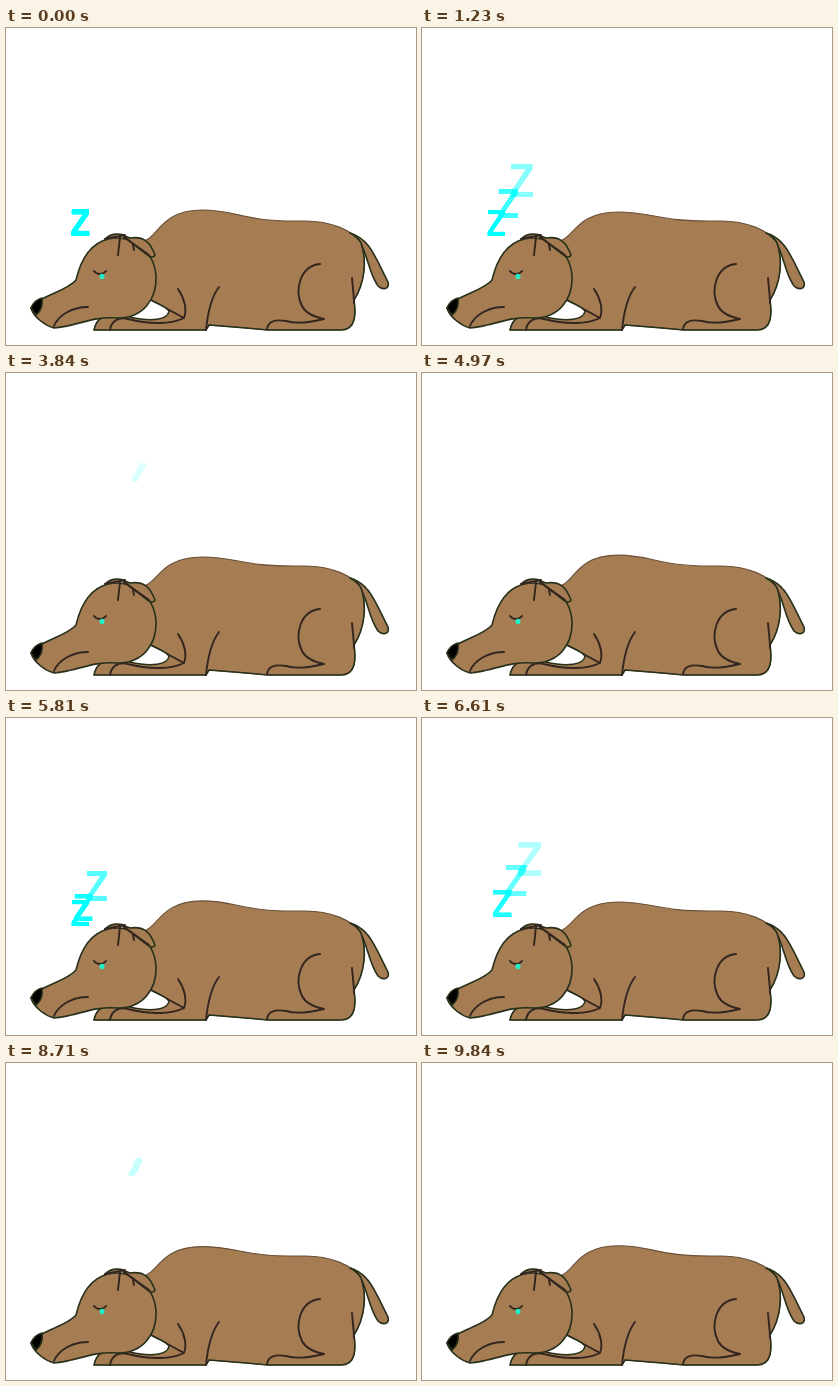
Recreate the animation shown at these times as an HTML page. Size 410x317 px, loop 9870 ms.

```html
<!DOCTYPE html>
<html lang="en">
<head>
<meta charset="utf-8">
<title>Sleeping dog</title>
<style>
  html, body { margin: 0; height: 100%; overflow: hidden; background: #fff; }
  svg { display: block; width: 410px; height: 317px; }
  path { fill: #a67c52; stroke: #26301a; stroke-width: 1.6; stroke-linecap: round; stroke-linejoin: round; }
  #body { stroke: #6a5138; stroke-width: 1.1; }
  .line { fill: none; stroke: #33251f; stroke-width: 1.9; }
  .edge { fill: none; }
  text { font: bold 35.6px "DejaVu Sans Mono", monospace; fill: #0ff; }
</style>
</head>
<body>
<svg viewBox="0 0 410 317">
  <!-- Faint letters vanish; only their overlaps stay strong -->
  <filter id="fade" filterUnits="userSpaceOnUse" x="0" y="0" width="410" height="317">
    <feComponentTransfer><feFuncA type="linear" slope="1.72" intercept="-.72"/></feComponentTransfer>
  </filter>

  <path d="M344 205C364 211 369 229 382 254C384 262 376 262 372 258C362 244 362 225 352 211Z"/>
  <path id="body"/>
  <path class="edge" d="M344 205C350 208 353 211 355 215C361 232 359 255 348 272C350 286 350 302 335 302L262 302L240 300L203 297L200 302L88 302C90 292 95 288 104 288"/>
  <path class="line" d="M172 261C179 271 181 282 178 290L143 271M104 302C105 294 112 288 122 291C145 297 166 296 178 290M200 302C202 282 206 268 213 259"/>
  <path class="line" d="M314 236C294 238 288 262 296 278C300 286 308 289 318 291C302 295 290 296 280 293C268 291 262 294 261 301M346 250C347 262 348 268 348 275"/>
  <path d="M124 288C135 285 140 277 143 271C151 276 160 278 163 283C162 292 145 294 124 289Z" style="fill:#fff"/>
  <path d="M25 280C32 268 60 264 70 252C74 235 82 216 102 211C122 206 148 220 150 248C151 270 138 290 112 290C85 288 72 298 48 300C40 298 28 290 25 280Z"/>
  <path d="M99 211C105 205 115 205 119 208L124 210C138 208 144 214 149 227C148 230 145 229 143 228L118 209"/>
  <path class="line" d="M99 211L119 207M114 209L112 227M118 209L143 227M127 217L128 222"/>
  <path class="line" d="M48 298C52 288 65 279 82 279M88 243C91 247 97 247 100 243"/>
  <path d="M25 280C28 273 32 271 36 270C37 278 34 284 30 287Z" style="fill:#000"/>
  <ellipse cx="96" cy="248.5" rx="2.5" ry="2.8" fill="#20f0c8"/>

  <g id="letters" filter="url(#fade)">
    <text>Z</text><text>Z</text><text>Z</text>
  </g>
</svg>
<script>
  const LOOP = 9.87, CYCLE = 5.01, DELAY = 0.66, LIFE = 4, BREATH = 2.6;
  const body = document.getElementById('body');
  const letters = document.querySelectorAll('#letters text');

  function drawBody(t) {
    const top = 183 - Math.cos(2 * Math.PI * t / BREATH);
    body.setAttribute('d', `M140 212C152 208 156 ${top} 196 ${top}C232 ${top} 235 194 295 193
      C325 192 347 203 355 215C361 232 359 255 348 272C350 286 350 302 335 302
      L262 302L240 300L203 297L200 302L88 302C90 292 95 288 104 288L140 270Z`);
  }

  function drawLetters(t) {
    letters.forEach((letter, i) => {
      const age = Math.max(0, t - i * DELAY);
      const x = 63.3 + 18.5 * age, y = 207.5 - 31 * age;
      letter.setAttribute('transform', `translate(${x} ${y}) scale(${1 + 0.2 * age})`);
      letter.setAttribute('opacity', Math.max(0, 1 - age / LIFE));
    });
  }

  function frame() {
    const t = performance.now() / 1000 % LOOP;
    drawBody(t);
    drawLetters(t % CYCLE);
    requestAnimationFrame(frame);
  }
  frame();
</script>
</body>
</html>
```
